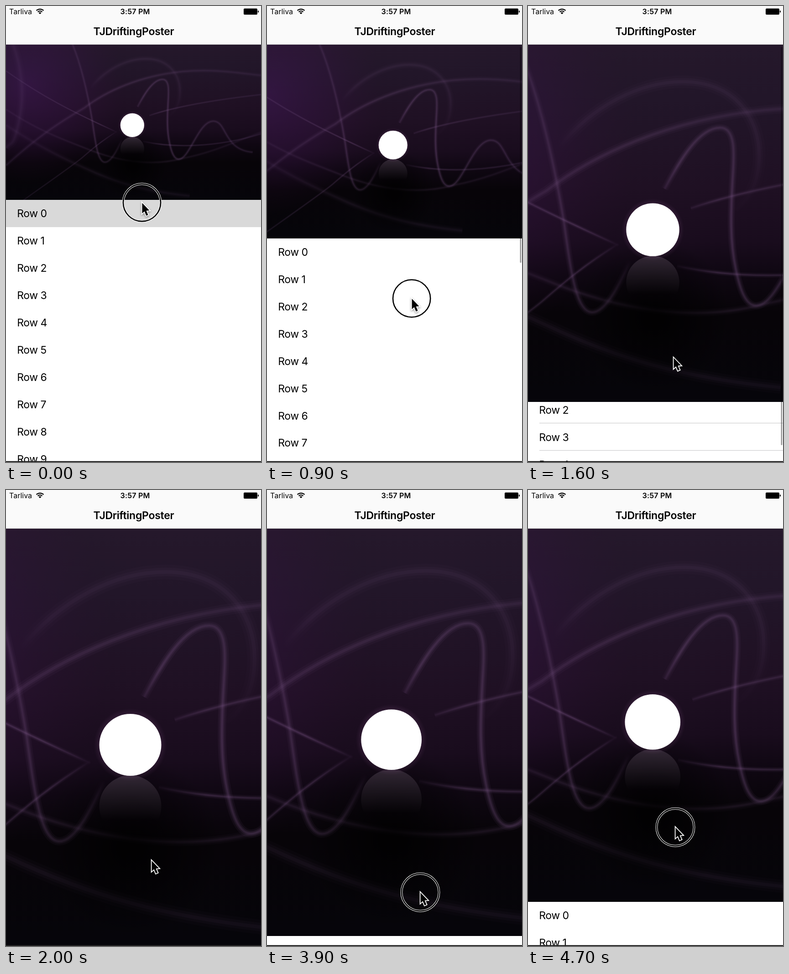
These frames come from a looping animation (559 by 1002 pixels, 5.1 s). An HTML page with a canvas:

```html
<!DOCTYPE html>
<html lang="en">
<head>
<meta charset="utf-8">
<title>Stretching header</title>
<style>
  html, body { margin: 0; width: 100%; height: 100%; overflow: hidden; background: #fff; }
  canvas { display: block; width: 559px; height: 1002px; }
</style>
</head>
<body>
<canvas id="stage" width="559" height="1002"></canvas>
<script>
const ctx = document.getElementById('stage').getContext('2d');
const W = 559, H = 1002, TOP = 85, LOOP = 5100, STEP = 100;
const FULL = H - TOP, MIN_FILL = 352, ROW = 59.9;
const FONT = 'Inter, Roboto, sans-serif';

// [time, lower edge of the header picture]
const EDGE = [[0, 426], [600, 485], [1300, 545], [1400, 589], [1500, 735], [1600, 870],
  [1700, 960], [1800, 1002], [3700, 1002], [3900, 980], [4700, 905]];

// [time, x, y]
const POINTER = [[0, 298, 432], [600, 316, 577], [1400, 319, 752], [2000, 319, 814],
  [2200, 321, 785], [2600, 331, 715], [2900, 338, 800], [3300, 341, 923], [3600, 337, 943],
  [3700, 337, 943], [3900, 336, 884], [4700, 323, 741]];

function at(keys, t, i = 1) {
  const n = keys.findIndex(k => k[0] > t);
  if (n < 0) return keys[keys.length - 1][i];
  const a = keys[n - 1], b = keys[n];
  return a[i] + (b[i] - a[i]) * (t - a[0]) / (b[0] - a[0]);
}

function paint(color, x, y, w, h) {
  ctx.fillStyle = color;
  ctx.fillRect(x, y, w, h);
}

function disc(x, y, r, style) {
  ctx.beginPath();
  ctx.arc(x, y, r, 0, Math.PI * 2);
  ctx.fillStyle = style;
  ctx.fill();
}

function ramp(gradient, ...stops) {
  stops.forEach(([pos, color]) => gradient.addColorStop(pos, color));
  return gradient;
}

function radial(x, y, r0, r1, ...stops) {
  return ramp(ctx.createRadialGradient(x, y, r0, x, y, r1), ...stops);
}

function vertical(y0, y1, ...stops) {
  return ramp(ctx.createLinearGradient(0, y0, 0, y1), ...stops);
}

function label(str, x, y, size, weight = 400, spacing = 0, align = 'left') {
  ctx.font = `${weight} ${size}px ${FONT}`;
  ctx.letterSpacing = spacing + 'px';
  ctx.textAlign = align;
  ctx.fillStyle = '#000';
  ctx.fillText(str, x, y);
}

// Artwork in the coordinates of the fully stretched picture
const backdrop = vertical(85, 1002,
  [0, '#25182b'], [0.15, '#221629'], [0.4, '#1f1023'], [0.55, '#190c1d'],
  [0.64, '#0f0712'], [0.75, '#070408'], [1, '#06050a']);
const leftGlow = radial(-330, 330, 0, 560,
  [0, 'rgba(68,24,92,.5)'], [0.55, 'rgba(58,20,74,.3)'], [1, 'rgba(50,18,56,0)']);
const trailInk = radial(272, 575, 85, 760,
  [0, 'rgba(122,82,138,0)'], [0.05, 'rgba(124,84,138,.4)'], [0.16, 'rgba(126,88,138,.9)'],
  [0.4, 'rgba(114,80,126,.75)'], [1, 'rgba(104,72,122,.6)']);
const arcInk = radial(330, 240, 60, 320,
  [0, 'rgba(116,84,128,.75)'], [0.7, 'rgba(112,80,124,.65)'], [1, 'rgba(108,76,120,0)']);
const floorShade = radial(275, 785, 20, 200, [0, 'rgba(0,0,0,.75)'], [1, 'rgba(0,0,0,0)']);
const mirror = vertical(627, 725, [0, 'rgba(225,205,225,.16)'], [1, 'rgba(225,205,225,0)']);
const halo = radial(272.5, 560, 66, 80, [0, 'rgba(150,90,150,.16)'], [1, 'rgba(150,90,150,0)']);

// Light trails: [line width, strength, path, ink]
const TRAILS = [
  [24, 0.28, 'M-415 80C-360 220-340 380-375 540S-420 650-448 690'],
  [9, 0.42, 'M-85 60C-20 200 20 390 45 540C62 660 75 772 117 772C155 772 192 690 222 625'],
  [12, 0.36, 'M-448 790C-250 610-120 530 0 460C120 368 310 278 559 253C740 236 880 262 1007 275'],
  [5, 0.55, 'M-448 250C-250 390-80 480 185 600'],
  [5, 0.42, 'M185 596C90 655 40 700-10 743S-260 925-350 990'],
  [9, 0.52, 'M303 455C340 385 390 298 445 298C488 298 480 375 477 430C472 520 470 590 485 660' +
    'C497 720 512 755 538 755C600 755 650 537 735 537C815 537 790 700 960 715'],
  [16, 0.24, 'M30 350C120 240 240 180 350 180C480 180 545 270 545 370C545 440 520 480 485 512', arcInk],
  [6, 0.42, 'M370 505C500 460 700 420 1007 385'],
  [6, 0.46, 'M335 653C500 690 750 690 1007 610'],
  [9, 0.24, 'M-448 470C-250 600-100 650 0 690C180 765 380 800 560 750C720 720 850 660 1007 600'],
  [16, 0.2, 'M-448 560C-250 690-100 760 0 805C180 890 350 940 600 965']
].map(([width, power, d, ink = trailInk]) => ({ width, power, path: new Path2D(d), ink }));

const ARROW = new Path2D('M0 0V23L5 18.5L9 28L13 26.2L9 17L15.8 16.5Z');

function drawPicture(edge) {
  const h = edge - TOP, scale = Math.max(h, MIN_FILL) / FULL;
  ctx.save();
  ctx.beginPath();
  ctx.rect(0, TOP, W, h);
  ctx.clip();
  ctx.translate(W / 2, TOP + h / 2);
  ctx.scale(scale, scale);
  ctx.translate(-W / 2, -TOP - FULL / 2);

  paint(backdrop, -460, 80, 1480, 930);
  paint(leftGlow, -460, 80, 1480, 930);
  for (const { width, power, path, ink } of TRAILS) {
    ctx.strokeStyle = ink;
    for (const [spread, part] of [[2, 0.18], [1.15, 0.3], [0.5, 0.4]]) {
      ctx.lineWidth = width * spread;
      ctx.globalAlpha = power * part;
      ctx.stroke(path);
    }
  }
  ctx.globalAlpha = 1;
  paint(floorShade, 75, 585, 400, 400);
  disc(272.5, 695, 68, mirror);
  disc(272.5, 560, 80, halo);
  disc(272.5, 560, 68, '#fff');
  ctx.restore();
}

function drawRows(top, picked, ruled) {
  for (let i = 0; top + i * ROW < H; i++) {
    const y = top + i * ROW;
    if (picked && i === 0) paint('#d9d9d9', 0, y, W, ROW);
    label('Row ' + i, 24.3, y + 38.4, 23, 400, -0.5);
    if (ruled) paint('#c4c4c6', 25, Math.round(y + ROW) - 1, W - 25, 1);
  }
}

function drawBar() {
  paint('#fafafa', 0, 0, W, TOP);
  paint('rgba(0,0,0,.22)', 0, TOP - 1, W, 1);
  label('Tarliva', 7, 18, 16);
  label('3:57 PM', 283, 18, 16, 600, 0.2, 'center');
  label('TJDriftingPoster', 280, 64, 23, 600, -0.25, 'center');

  ctx.strokeStyle = '#000';
  ctx.lineWidth = 2.2;
  for (const r of [7, 11.2]) {
    ctx.beginPath();
    ctx.arc(74.5, 18, r, -Math.PI * 0.75, -Math.PI * 0.25);
    ctx.stroke();
  }
  ctx.beginPath();
  ctx.moveTo(74.5, 18);
  ctx.arc(74.5, 18, 4.2, -Math.PI * 0.75, -Math.PI * 0.25);
  ctx.fill();

  ctx.beginPath();
  ctx.roundRect(521, 5.5, 30, 13.5, 2);
  ctx.roundRect(552, 10, 2, 4.5, 1);
  ctx.fill();
}

function drawScroller(t, edge) {
  if (t < 100 || t >= 1900) return;
  const end = t < 1400 ? 590 - Math.max(0, edge - 485) : 965;
  ctx.fillStyle = 'rgba(0,0,0,.38)';
  ctx.beginPath();
  ctx.roundRect(554.5, 90, 3, end - 90, 1.5);
  ctx.fill();
}

function drawPointer(x, y, pressed) {
  if (pressed) {
    for (const [color, width] of [['#fff', 4.6], ['#000', 2.6]]) {
      ctx.beginPath();
      ctx.arc(x, y, 41.1, 0, Math.PI * 2);
      ctx.strokeStyle = color;
      ctx.lineWidth = width;
      ctx.stroke();
    }
  }
  ctx.save();
  ctx.translate(x + 0.5, y + 0.7);
  ctx.strokeStyle = '#fff';
  ctx.lineWidth = 3.6;
  ctx.shadowColor = 'rgba(0,0,0,.4)';
  ctx.shadowBlur = 4;
  ctx.shadowOffsetY = 2;
  ctx.stroke(ARROW);
  ctx.shadowColor = 'transparent';
  ctx.fillStyle = '#000';
  ctx.fill(ARROW);
  ctx.restore();
}

function draw(t) {
  const edge = at(EDGE, t);
  const expanding = t >= 1400 && t < 1800;
  paint('#fff', 0, 0, W, H);
  drawRows(expanding ? edge - 132.5 : edge, t < 100, expanding);
  drawPicture(edge);
  drawScroller(t, edge);
  drawBar();
  paint('#222', 0, 1000, W, 2);
  drawPointer(at(POINTER, t), at(POINTER, t, 2), t < 1500 || t >= 3600);
}

const start = performance.now();
function tick() {
  const t = (performance.now() - start) % LOOP;
  draw(Math.floor(t / STEP) * STEP);
  requestAnimationFrame(tick);
}
tick();
</script>
</body>
</html>
```
